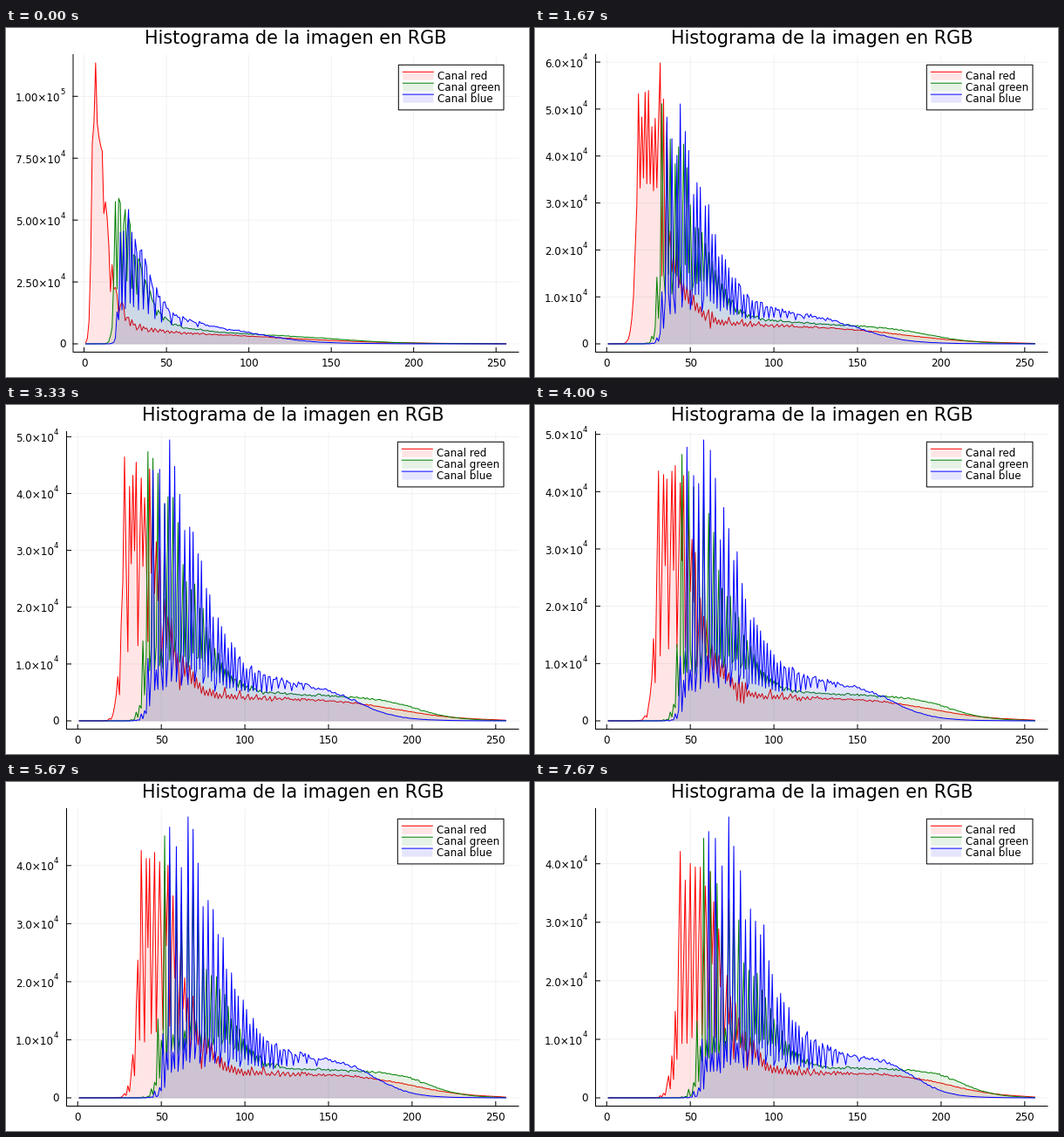
A matplotlib script for the animation above (8 s loop, 600x400 px).

```python
import matplotlib.pyplot as plt
import numpy as np
from matplotlib.animation import FuncAnimation
from matplotlib.patches import Rectangle

STEPS, FRAMES, LOOP_MS = 24, 160, 8000
PT = 0.72                       # points per pixel at 100 dpi
RIGHT, TOP, BOTTOM = 588, 31, 371.5
ZERO_Y, PEAK_Y = 362, 40
BINS = np.arange(256)
LEVELS = np.arange(255) + 0.15  # luminance levels of the picture
MAIN = 10                       # level of the dominant dark colour
SPREAD = 1.2 + LEVELS / 60      # chroma spread around each level

plt.rcParams["font.family"] = "DejaVu Sans"
rng = np.random.default_rng(7)


def fall(x, mid, width):
    """Smooth step from 1 down to 0."""
    return 1 / (1 + np.exp((x - mid) / width))


def brighten(y, step):
    """Logarithmic luminance correction that grows stronger with each step."""
    k = step + 1
    return 255 * np.log1p(k * y / 255) / np.log1p(k)


def tint(y):
    """Strength of the colour cast, 1 at the dominant dark colour."""
    return y / LEVELS[MAIN] * np.exp((LEVELS[MAIN] - y) / 25)


class Channel:
    def __init__(self, name, color, dark, start, hump, tail, peak, comb, echo):
        self.name, self.color, self.peak, self.echo = name, color, peak, echo
        self.cast = dark - LEVELS[MAIN]
        end = self.position(LEVELS, STEPS - 1)
        density = fall(-end, -start, 2) * sum(
            height * fall(end, mid, width) for height, mid, width in (hump, tail))
        ripple = 1 + 0.55 * np.exp(-LEVELS / 30) * (rng.random(LEVELS.size) - 0.5)
        ripple[MAIN] = 1.3
        self.weight = density * np.gradient(end) * ripple
        sharpness, reach = comb
        self.sharp = sharpness * np.exp(-(LEVELS / reach) ** 2)
        self.grain = 1 + 0.025 * rng.standard_normal(256)

    def position(self, y, step):
        return np.maximum(brighten(y, step) + self.cast * tint(y), 0)

    def histogram(self, step):
        """Counts per bin, in thousands."""
        counts = np.zeros(256)
        for lag, share in ((0, 1 - self.echo), (0.45, self.echo)):
            pos = self.position(np.maximum(LEVELS - lag, 0), step)
            bins = np.clip(np.rint(pos), 0, 255).astype(int)
            np.add.at(counts, bins, self.weight * share * self.sharp)
            kernel = np.exp(-0.5 * ((BINS[:, None] - pos) / SPREAD) ** 2)
            kernel /= kernel.sum(axis=0)
            counts += kernel @ (self.weight * share * (1 - self.sharp))
        counts *= self.grain
        top = counts.max()
        floor, extra, decay = self.peak
        peak = floor + extra * np.exp(-step / decay)
        return counts * (peak / top) ** (counts / top)


# hump and tail: height, midpoint, width; peak: floor, extra, decay
CHANNELS = [
    Channel("red", "#ff0000", dark=0, start=41.5, hump=(21, 72, 8.5),
            tail=(4.2, 205, 16), peak=(42, 71.5, 3.6), comb=(0.6, 46), echo=0.35),
    Channel("green", "#008000", dark=14, start=55.5, hump=(14.5, 94, 11),
            tail=(4.9, 212, 10), peak=(43.8, 15, 7), comb=(0.7, 24), echo=0.12),
    Channel("blue", "#0000ff", dark=17, start=58.5, hump=(10, 100, 8),
            tail=(7.2, 183, 10), peak=(47.7, 6.6, 7.5), comb=(0.75, 42), echo=0.1),
]

fig = plt.figure(figsize=(6, 4), dpi=100, facecolor="white")
ax = fig.add_axes([0, 0, 1, 1])
shown = None


def line(xs, ys, color="black", width=1.0, **kw):
    ax.plot(xs, ys, color=color, lw=width * PT, snap=False, **kw)


def text(x, y, label, size=11.9, ha="center", **kw):
    ax.text(x, y, label, fontsize=size * PT, ha=ha, va="baseline", **kw)


def draw_axes(left, x_of, y_of, top):
    step = 25 if top > 100 else 20 if top > 60 else 10
    digits = 2 if step == 25 else 1
    for v in range(0, 251, 50):
        line([x_of(v)] * 2, [TOP, BOTTOM], "#ececec", 0.7, zorder=1)
        line([x_of(v)] * 2, [BOTTOM - 5, BOTTOM], zorder=8)
        text(x_of(v), 388, str(v))
    for v in range(0, 200, step):
        y = y_of(v)
        if y < TOP - 0.6:
            break
        line([left, RIGHT], [y, y], "#ececec", 0.7, zorder=1)
        line([left, left + 5], [y, y], zorder=8)
        if v == 0:
            text(left - 8.5, y + 4.4, "0", ha="right")
            continue
        power = 5 if v >= 100 else 4
        mantissa = v / 10 ** (power - 3)
        text(left - 14.5, y + 5.7, f"{mantissa:.{digits}f}×10", ha="right")
        text(left - 14.5, y - 2.6, str(power), 8.5, ha="left")
    line([left, left, RIGHT], [TOP - 0.5, BOTTOM, BOTTOM], zorder=8)


def draw_legend(left):
    ax.add_patch(Rectangle((left, 42.3), 571 - left, 51.6, fc="white",
                           ec="black", lw=PT, snap=False, zorder=9))
    for i, ch in enumerate(CHANNELS):
        y = 50.3 + 12.9 * i
        ax.add_patch(Rectangle((left + 5, y), 35, 9.5, fc=ch.color, alpha=0.1,
                               lw=0, snap=False, zorder=10))
        line([left + 5, left + 40], [y, y], ch.color, zorder=11)
        text(left + 45, y + 8.9, f"Canal {ch.name}", ha="left", zorder=11)


def draw_step(step):
    ax.clear()
    ax.set(xlim=(0, 600), ylim=(400, 0))
    ax.axis("off")
    data = [ch.histogram(step) for ch in CHANNELS]
    top = max(counts.max() for counts in data)
    left = 77 if top > 100 else 69.5      # longer tick labels need more room
    scale = (RIGHT - left) / 270.3

    def x_of(v):
        return left + (v + 6.65) * scale

    def y_of(v):
        return ZERO_Y - (ZERO_Y - PEAK_Y) * v / top

    draw_axes(left, x_of, y_of, top)
    xs = x_of(BINS + 1)
    for i, (ch, counts) in enumerate(zip(CHANNELS, data)):
        ax.fill_between(xs, y_of(counts), ZERO_Y, color=ch.color, alpha=0.1,
                        lw=0, zorder=2 + 2 * i)
        line(xs, y_of(counts), ch.color, zorder=3 + 2 * i)
    draw_legend(450.3 if top > 100 else 449.3)
    text((left + RIGHT) / 2, 18.3, "Histograma de la imagen en RGB", 20.75)


def draw(frame):
    """Redraw only when the frame enters a new step."""
    global shown
    step = ((frame + 1) * STEPS - 1) // FRAMES
    if step != shown:
        draw_step(step)
        shown = step
    return []


anim = FuncAnimation(fig, draw, frames=FRAMES, interval=LOOP_MS / FRAMES,
                     init_func=lambda: draw(0), repeat=True, repeat_delay=0)
plt.show()
```
